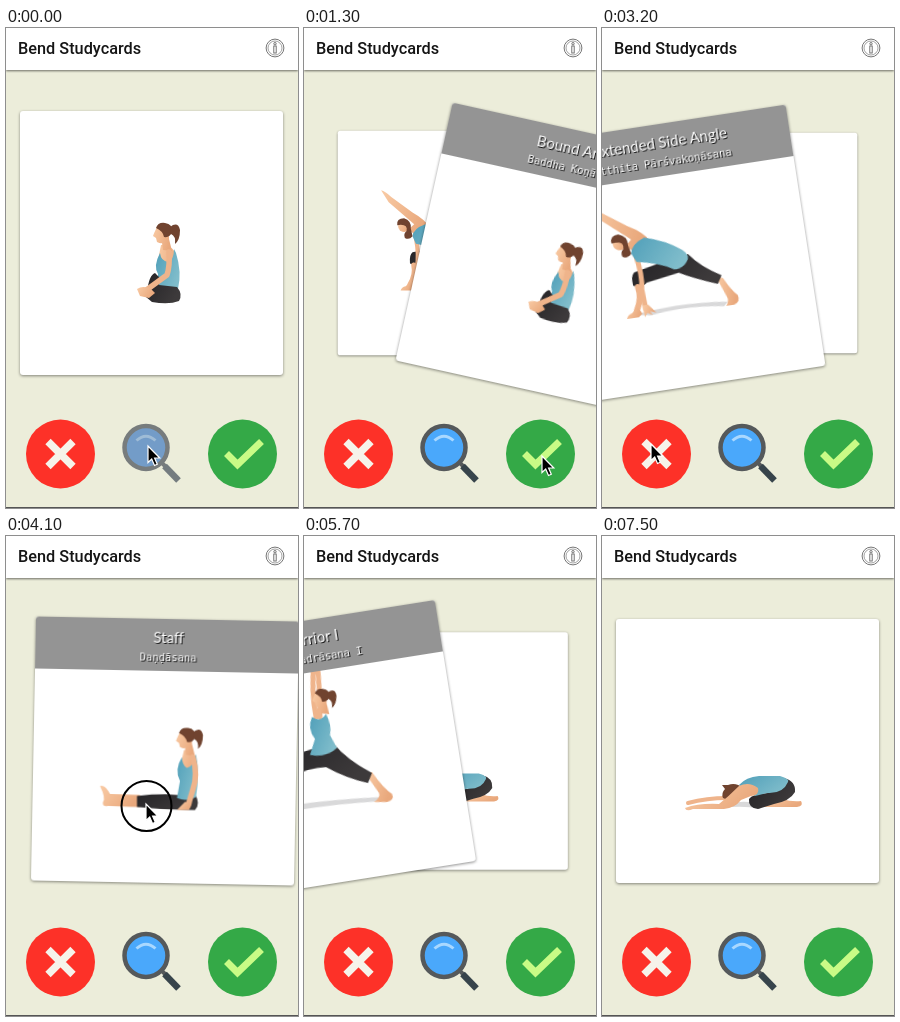
An HTML page that plays this animation: 292 by 480 pixels, repeating every 7.6 s.

```html
<!DOCTYPE html>
<html lang="en">
<head>
<meta charset="utf-8">
<title>Bend Studycards</title>
<style>
  html, body { margin: 0; width: 100%; height: 100%; overflow: hidden; background: #ecedda; }
  svg { display: block; width: 292px; height: 480px; }
  .card { filter: drop-shadow(0 1px 1.5px rgba(0, 0, 0, .45)); }
  .bar { filter: drop-shadow(0 1px 1.2px rgba(0, 0, 0, .55)); }
  .brand { font: 500 16.3px Roboto, sans-serif; fill: #151515; }
  .label { fill: #fff; text-anchor: middle; filter: drop-shadow(1px 1px 0 #111); }
  .name { font: 15px Lato, sans-serif; }
  .sanskrit { font: 10.5px "DejaVu Sans Mono", monospace; }
  .skin { fill: url(#skin); }
  .top { fill: url(#teal); }
  .pants { fill: url(#dark); }
  .hair { fill: #70432f; }
  .shade { fill: #d9d9da; }
  .limb { fill: none; stroke: #efb48b; stroke-linecap: round; stroke-linejoin: round; }
  #loupe .rim { stroke: #55595b; }
  #loupe .lens { fill: #4aa8fb; }
  #loupe .grip { stroke: #37444b; }
  #loupe .shine { stroke: #a9d8ff; }
  #loupe.dim .rim { stroke: #777c7d; }
  #loupe.dim .lens { fill: #739cc8; }
  #loupe.dim .grip { stroke: #747c7f; }
  #loupe.dim .shine { stroke: #9fbcd6; }
</style>
</head>
<body>
<svg viewBox="0 0 292 480">
  <defs>
    <linearGradient id="skin" x2="1" y2=".4"><stop stop-color="#f9cba5"/><stop offset="1" stop-color="#e9a87c"/></linearGradient>
    <linearGradient id="teal" x2="1" y2=".6"><stop stop-color="#509fb9"/><stop offset="1" stop-color="#80bdcb"/></linearGradient>
    <linearGradient id="dark" x2="1" y2=".5"><stop stop-color="#242326"/><stop offset="1" stop-color="#3d3a3b"/></linearGradient>
    <g id="head">
      <path class="skin" d="M-8-6Q-11 0-12 3L-9 5-8 9Q-4 11-3 10L-2 17 7 18 4 6 4-6Z"/>
      <path class="hair" d="M-9-5Q-7-11 0-10Q8-9 7-1Q5 5-1 4Q-2-2-9-5Z"/>
      <path class="hair" d="M5-6Q13-12 15-3Q15 7 10 11Q11 3 6 1Z"/>
    </g>
  </defs>

  <rect width="292" height="480" fill="#ecedda"/>
  <g id="deck"></g>

  <rect class="bar" y="-4" width="292" height="46" fill="#fff"/>
  <text class="brand" x="12" y="26">Bend Studycards</text>
  <g fill="none" stroke="#666" stroke-width=".9">
    <circle cx="269" cy="20" r="8.9"/>
    <circle cx="269" cy="20" r="7" stroke-width=".6"/>
    <circle cx="269" cy="15.7" r="1.2"/>
    <rect x="267.8" y="18" width="2.4" height="7"/>
  </g>

  <circle cx="54.5" cy="426" r="34.5" fill="#fd3128"/>
  <path d="M42 413.5 67 438.500M67 413.500 42 438.500" stroke="#f6f3ea" stroke-width="7.500"/>
  <circle cx="236.500" cy="426" r="34.500" fill="#34a947"/>
  <path d="M220.500 425.500 231.500 436.500 255.500 413.500" fill="none" stroke="#c9fb86" stroke-width="7"/>
  <g id="loupe" fill="none">
    <path class="rim" d="M155 434 160 439" stroke-width="4"/>
    <path class="grip" d="M158.500 438 172.500 452.500" stroke-width="6.500"/>
    <circle class="lens rim" cx="140" cy="419.500" r="21.500" stroke-width="4.500"/>
    <path class="shine" d="M130.500 412.500Q140 404 149.500 412.500" stroke-width="3"/>
  </g>
  <rect y="479" width="292" height="1" fill="#555"/>

  <g id="cursor">
    <circle id="ring" cx=".5" cy="2" r="25" fill="none" stroke="#000" stroke-width="2"/>
    <path d="M0 0V16.500L3.700 13 6.500 19.500 9.300 18.300 6.600 12H11.800Z" stroke="#fff" stroke-width="1.200"/>
  </g>
</svg>

<script>
const LOOP = 7600, STEP = 100, CX = 145.5, CY = 215;
const shape = (kind, d) => `<path class="${kind}" d="${d}"/>`;
const limb = (width, d) => `<path class="limb" stroke-width="${width}" d="${d}"/>`;
const head = (x, y, more = '') => `<use href="#head" transform="translate(${x} ${y}) ${more}"/>`;
const moved = (transform, art) => `<g transform="${transform}">${art}</g>`;

const seated =
  shape('skin', 'M155 217Q163 215 169 224L172 244 168 262 153 258 152 232Z') +
  shape('top', 'M154 225Q147 238 152 246L152 261H172Q176 244 170 225L168 221Q168 232 162 234Q155 233 154 225Z') +
  head(159, 205) +
  shape('pants', 'M141 264Q143 247 149 245L154 250 153 257 171 259Q177 266 173 273Q163 277 146 274L140 269Z') +
  limb(5.5, 'M163 224Q164 238 161 247L139 263') +
  shape('skin', 'M131 261Q137 257 145 261L149 265 143 270 134 268Z');

const sideAngle =
  shape('shade', 'M96 268Q140 262 190 269L186 273Q146 266 112 271Z') +
  shape('skin', 'M182 242L189 245Q195 258 201 264Q203 271 196 273H188Q192 268 190 264Z') +
  shape('pants', 'M146 217L158 216Q168 230 188 242L183 250Q160 241 146 233L113 238 107 242 99 239Q98 229 102 226Z') +
  limb(6, 'M103.500 241Q106 252 99 264') +
  shape('skin', 'M100 260L104 268 100 271H88Q89 267 94 266Z') +
  limb(5, 'M106 209Q110 230 107 244L108 264') +
  shape('skin', 'M105 260L111 260 118 269 112 267 114 271 109 268 106 272Z') +
  shape('skin', 'M65 153Q70 154 77 161L102 179Q118 188 122 197L106 206 97 199 104 193 74 167Z') +
  shape('top', 'M102 207Q103 198 117 193Q138 199 153 211Q161 218 155 224Q150 230 142 229Q128 220 106 216Z') +
  `<circle class="skin" cx="92" cy="195" r="7"/>` +
  shape('hair', 'M84 194Q83 186 92 186Q101 189 100 198L102 207Q98 212 93 209Q91 204 95 201Q97 192 84 194Z');

const staff = moved(`rotate(-1.1 ${CX} ${CY}) translate(-13.5 0)`,
  shape('skin', 'M94 250Q99 248 104 258L134 259V271Q118 271 102 270Q96 271 97 266Q100 262 94 250Z') +
  shape('skin', 'M178 214Q187 213 191 226V242L172 240Z') +
  shape('pants', 'M131 260Q153 257 172 259L189 258Q195 268 189 274Q159 274 131 271Z') +
  shape('top', 'M176 221Q168 234 174 245L171 262Q181 266 190 261Q194 238 190 218Q187 231 181 232Q176 229 176 221Z') +
  head(182, 202) +
  limb(5.5, 'M187 221Q192 239 187 253L182 270') +
  shape('skin', 'M179 266L186 267 183 274H171Z'));

const warrior = moved(`rotate(9 ${CX} ${CY}) translate(124 0)`,
  shape('shade', 'M-42 275Q10 264 78 261L80 265Q18 269-34 279Z') +
  limb(5, 'M12 181Q7 157 10 124M16 181Q16 155 13 124') +
  shape('skin', 'M61 237L68 236Q79 252 88 258Q91 264 83 266H70Q77 262 75 257Z') +
  limb(8, 'M-27 236Q-24 252-31 272') +
  shape('skin', 'M-35 268L-27 270-28 278H-44Z') +
  shape('pants', 'M5 214L29 207Q43 224 68 237L64 247Q42 242 22 231Q-4 233-20 246L-32 240Q-32 227-22 223Z') +
  shape('top', 'M8 181Q16 187 22 178Q28 189 26 199L33 212Q22 222 6 219L11 203Q3 193 8 181Z') +
  head(19, 162, 'scale(.9)'));

const child =
  shape('shade', 'M120 269Q140 263 160 268L158 273Q140 269 122 272Z') +
  limb(4, 'M86 267Q105 262 125 262') +
  shape('skin', 'M158 267L180 263Q190 266 199 265Q202 270 195 271H156Z') +
  shape('pants', 'M182 242Q194 245 193 256Q188 265 172 268L156 273Q146 272 147 263Q150 258 166 257Z') +
  shape('top', 'M137 249Q144 241 157 240H178Q188 243 186 246Q181 258 165 257L153 260Z') +
  shape('hair', 'M120 249L126 249Q134 246 141 252L139 260Q130 267 121 262Q119 257 123 253Z') +
  shape('skin', 'M137 250Q147 245 156 252Q158 259 149 260L139 264Q133 272 122 273H91Q84 276 83 272Q97 267 117 268Q127 260 137 250Z');

// move: time, dx, dy, angle; rise: time and scale of the card below
const cards = [
  { name: 'Bound Angle', sanskrit: 'Baddha Koṇāsana', art: seated, shown: 300,
    move: [[1100, 0, 0, 0], [1300, 103, 17, 12.5], [1700, 420, 60, 45]],
    rise: [[1100, .8], [1300, .85], [1600, 1]] },
  { name: 'Extended Side Angle', sanskrit: 'Utthita Pārśvakoṇāsana', art: sideAngle, shown: 2300,
    move: [[3000, 0, 0, 0], [3200, -72, 12, -8.7], [3600, -400, 50, -40]],
    rise: [[3000, .8], [3200, .835], [3600, 1]] },
  { name: 'Staff', sanskrit: 'Daṇḍāsana', art: staff, shown: 3700,
    move: [[4000, 0, 0, 0], [4100, 13.5, 0, 1.1], [4500, 140, 0, 10], [4800, 420, 0, 30]],
    rise: [[4000, .8], [4500, .89], [4800, 1]] },
  { name: 'Warrior I', sanskrit: 'Vīrabhadrāsana I', art: warrior, shown: 5200,
    move: [[5400, 0, 0, 0], [5700, -124, 0, -9], [6100, -430, 0, -30]],
    rise: [[5400, .8], [5700, .9], [6000, 1]] },
  { name: 'Child', sanskrit: 'Bālāsana', art: child, shown: Infinity,
    move: [[LOOP, 0, 0, 0]], rise: [[LOOP, 1]] }
];

const path = [
  [0, 142, 418], [500, 142, 418], [900, 238, 428], [1600, 238, 428],
  [2100, 141, 413], [2500, 141, 413], [2900, 49, 416], [3250, 49, 416],
  [3600, 141, 415], [3700, 141, 415], [4000, 126.5, 268], [4100, 140, 268],
  [4500, 266, 268], [4800, 266, 268], [5100, 141, 415], [5200, 141, 415],
  [5400, 90, 268], [5700, -34, 268], [5800, -80, 268]
];
const presses = [[200, 400], [1000, 1100], [2200, 2300], [2900, 3000], [3600, 3700], [4000, 4500], [5100, 5200], [5400, 5800]];

const el = id => document.getElementById(id);
const clamp = v => Math.min(1, Math.max(0, v));

function at(keys, t) {
  const next = keys.findIndex(k => k[0] > t);
  if (next === 0) return keys[0].slice(1);
  if (next < 0) return keys[keys.length - 1].slice(1);
  const a = keys[next - 1], b = keys[next], p = (t - a[0]) / (b[0] - a[0]);
  return a.slice(1).map((v, i) => v + (b[i + 1] - v) * p);
}

el('deck').innerHTML = cards.map(c => `<g class="card">
  <rect x="14" y="83" width="263" height="264" rx="3" fill="#fff"/>${c.art}
  <g class="title"><path d="M14 135V86Q14 83 17 83H274Q277 83 277 86V135Z" fill="#949494"/>
  <g class="label"><text class="name" x="147" y="107">${c.name}</text>
  <text class="sanskrit" x="147" y="125">${c.sanskrit}</text></g></g></g>`).reverse().join('');
const nodes = [...el('deck').children].reverse();

function draw(t) {
  cards.forEach((card, i) => {
    const node = nodes[i], above = cards[i - 1];
    const last = card.move[card.move.length - 1][0];
    const [dx, dy, turn] = at(card.move, t);
    const scale = above ? at(above.rise, t)[0] : 1;
    const visible = t < last && (!above || t >= above.move[0][0]);
    node.style.display = visible ? '' : 'none';
    node.setAttribute('transform',
      `translate(${CX + dx} ${CY + dy}) rotate(${turn}) scale(${scale}) translate(${-CX} ${-CY})`);
    node.querySelector('.title').style.opacity = clamp((t - card.shown + STEP) / 200);
  });
  const [x, y] = at(path, t);
  el('cursor').setAttribute('transform', `translate(${x} ${y})`);
  el('ring').style.display = presses.some(([a, b]) => t >= a && t < b) ? '' : 'none';
  el('loupe').classList.toggle('dim', Math.hypot(x - 140, y - 419) < 24);
}

const start = performance.now();
function tick() {
  const t = (performance.now() - start) % LOOP;
  draw(Math.floor(t / STEP) * STEP);
  requestAnimationFrame(tick);
}
tick();
</script>
</body>
</html>
```
